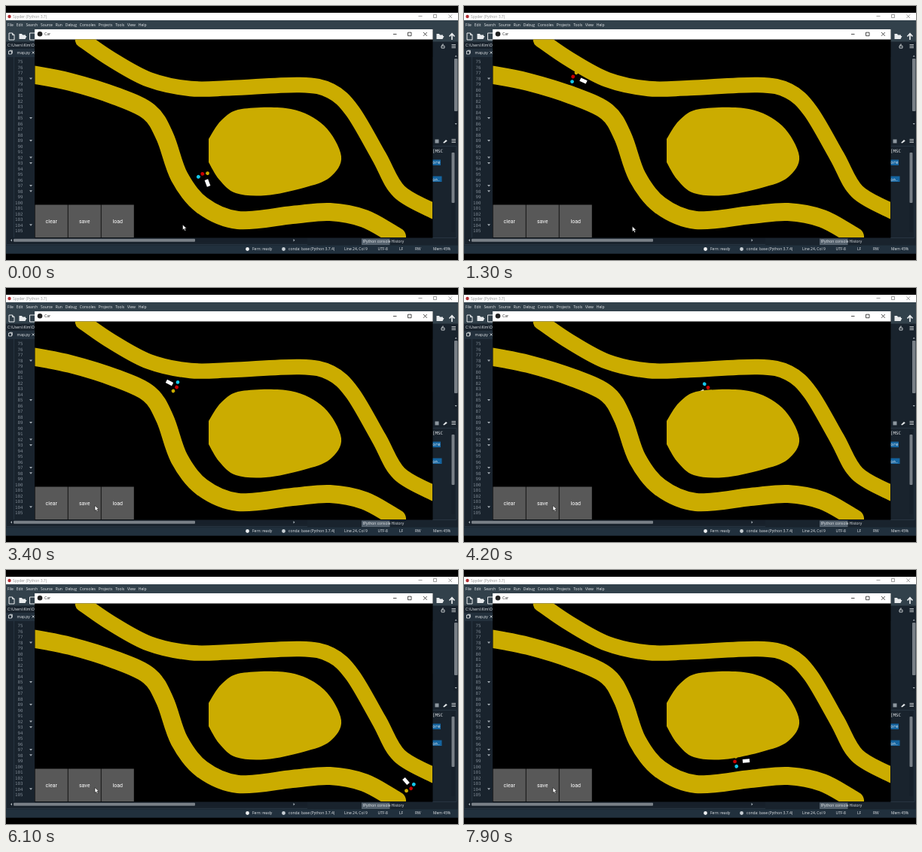
Recreate the animation shown at these times as an HTML page. Size 600x338 px, loop 8000 ms.

```html
<!DOCTYPE html>
<html lang="en">
<head>
<meta charset="utf-8">
<title>Car</title>
<style>
  html, body { margin: 0; width: 100%; height: 100%; overflow: hidden; background: #000; }
  svg { display: block; width: 100vw; height: 100vh; }
  text { font: 5px "Open Sans", "Noto Sans", sans-serif; fill: #e6e9ec; white-space: pre; }
  .mono { font: 5.8px "DejaVu Sans Mono", monospace; }
  .button { font: 7px Roboto, sans-serif; fill: #fff; text-anchor: middle; }
  .line { fill: none; stroke: #e8ebed; }
  .thin { fill: none; stroke: #e8ebed; stroke-width: .8; }
  .edge { fill: none; stroke: #2d3b48; stroke-width: .7; }
  .groove { fill: #17202a; }
  .handle { fill: #798087; }
</style>
</head>
<body>
<svg viewBox="0 0 600 338">
  <defs>
    <clipPath id="stage"><rect x="38.5" y="44.5" width="527.5" height="263.5"/></clipPath>
    <path id="folder" d="M0 7V0h3.500l1 1.500h4V3H10L8 7z" fill="#e8ebed"/>
    <path id="burger" d="M0 0h5.500M0 2h5.500M0 4h5.500" class="thin"/>
  </defs>
  <rect width="600" height="338"/>
  <rect y="9" width="600" height="320.5" fill="#19232d"/>

  <!-- editor window -->
  <rect y="9" width="600" height="10" fill="#fff"/>
  <circle cx="4.5" cy="14" r="2.2" fill="#b32d32"/>
  <text x="9" y="15.800" style="fill:#909090">Spyder (Python 3.7)</text>
  <path d="M547.5 13.500h5M567.500 11.500h4v4h-4zM587.500 11.500l4.500 4.500m0-4.500l-4.500 4.500" fill="none" stroke="#777" stroke-width=".7"/>
  <rect y="19" width="600" height="28.500" fill="#32414b"/>
  <text id="menu" y="27"></text>
  <path d="M4 36h4.500l2.500 2.500v6.500h-7zM8.500 36v2.500h2.500M31.500 36h7v9h-7z" class="line"/>
  <use href="#folder" x="17.500" y="37"/>
  <use href="#folder" x="571.500" y="37"/>
  <path d="M592 45v-8m-3.500 3.500l3.500-3.700l3.500 3.700" class="line" style="stroke-width:1.7"/>
  <text x="2" y="54">C:\Users\Kim\De</text>
  <path d="M578 53h4v3h-4zM579 53v-1.500q1-1.500 2 0" class="thin"/>
  <use href="#burger" x="591.500" y="51.500"/>
  <rect y="57" width="39" height="11" fill="#23303c"/>
  <path d="M3.500 60h4v4h-4zM5 60v-.8h3.300v4" class="thin"/>
  <text x="14.500" y="64">map.py</text>
  <path d="M34.700 60.500l3 3m0-3l-3 3" class="thin"/>
  <path d="M10.500 68v240M.5 68v249.500H400M566 68v70M566 186.500h32v122h-32" class="edge"/>
  <g id="gutter"></g>
  <rect x="5" y="308.500" width="395" height="6.500" class="groove"/>
  <rect x="10" y="309.800" width="241" height="4" rx="1" class="handle"/>
  <path d="M8 310l-2 1.800l2 1.800zM381.500 310l2 1.800l-2 1.800z" fill="#aab2b9"/>
  <rect x="594.500" y="65" width="5.500" height="96" class="groove"/>
  <rect x="595" y="70" width="4.500" height="70" rx="1" class="handle"/>
  <path d="M595.700 67.500l1.500-2l1.500 2zM595.700 156l1.500 2l1.500-2z" fill="#aab2b9"/>
  <rect x="569.500" y="177.500" width="5" height="5" fill="#8d979f"/>
  <path d="M580 182l4-4l1.800 1.500l-4 3z" fill="#e8ebed"/>
  <use href="#burger" x="591.500" y="177.500"/>
  <rect x="566" y="204.500" width="11" height="7.500" fill="#1464a0"/>
  <rect x="566" y="226.500" width="12.500" height="7.500" fill="#1464a0"/>
  <text x="566" y="195" class="mono">[MSC</text>
  <text x="566" y="210" class="mono">ore</text>
  <text x="566" y="232.500" class="mono">on.</text>
  <rect x="591" y="189" width="5" height="112" class="groove"/>
  <rect x="591.500" y="195" width="4" height="67" rx="1" class="handle"/>
  <rect x="472" y="309.500" width="37.500" height="8.500" fill="#54616d"/>
  <text x="473.500" y="315.300">IPython console</text>
  <text x="511.500" y="315">History</text>
  <rect y="318.500" width="600" height="11" fill="#21303d"/>
  <circle cx="320.500" cy="323.500" r="2.400" fill="#eef0f2"/>
  <circle cx="368.500" cy="323.500" r="2.400" fill="#c6cdd3"/>
  <g id="status"></g>

  <!-- game window -->
  <rect x="38" y="31" width="528.500" height="277.500"/>
  <rect x="38" y="31" width="528.500" height="13.500" fill="#fff"/>
  <circle cx="45" cy="37.300" r="3.300" fill="#222"/>
  <text x="51" y="39.300" style="fill:#222">Car</text>
  <path d="M514 37.500h4.500M533.500 35.200h4.500v4.500h-4.500zM554 35l4.800 4.800m0-4.800l-4.800 4.800" fill="none" stroke="#222" stroke-width=".8"/>
  <g clip-path="url(#stage)">
    <g id="car">
      <rect id="body" x="-4.600" y="-2.400" width="9.200" height="4.800" fill="#fff"/>
      <g id="sensors"></g>
    </g>
    <g id="sand" fill="none" stroke="#cbac00" stroke-linecap="round"></g>
  </g>
  <g id="buttons"></g>
  <path id="cursor" d="M0 0v7l1.700-1.500l1.200 2.700l1.300-.6l-1.200-2.600h2.200z" fill="#fff" stroke="#000" stroke-width=".5"/>
</svg>
<script>
const LOOP = 8000, STEP = 100;
const $ = id => document.getElementById(id);

function add(parent, tag, attrs, text) {
  const el = document.createElementNS("http://www.w3.org/2000/svg", tag);
  for (const name in attrs) el.setAttribute(name, attrs[name]);
  if (text !== undefined) el.textContent = text;
  return $(parent).appendChild(el);
}

// Labels and controls
"File Edit Search Source Run Debug Consoles Projects Tools View Help".split(" ")
  .forEach((name, i) => add("menu", "tspan", { dx: i ? 3.8 : 2 }, name));

const status = { "Fern: ready": 327, "conda: base (Python 3.7.4)": 375, "Line 24, Col 9": 449,
  "UTF-8": 493.5, "LF": 522, "RW": 543, "Mem 45%": 567 };
for (const text in status) add("status", "text", { x: status[text], y: 325.3 }, text);

const folds = [78, 85, 89, 92, 93, 97, 98, 104];
for (let n = 75; n <= 105; n++) {
  const y = 74.3 + (n - 75) * 7.49;
  add("gutter", "text", { x: 22.5, y: y + 2, class: "mono", style: "fill:#7d8791;text-anchor:end" }, n);
  if (folds.includes(n)) add("gutter", "path", { d: `M31 ${y - 1.2}h4l-2 2.5z`, fill: "#a5adb4" });
}

["clear", "save", "load"].forEach((name, i) => {
  const x = 38.6 + i * 44;
  add("buttons", "rect", { x, y: 264.5, width: 43.2, height: 43.5, fill: "#585858" });
  add("buttons", "text", { x: x + 21.6, y: 289.2, class: "button" }, name);
});

// Smooth path through a few points
function curve(points) {
  const at = i => points[Math.max(0, Math.min(points.length - 1, i))];
  let d = `M${points[0]}`;
  for (let i = 0; i < points.length - 1; i++) {
    const [a, b, c, e] = [at(i - 1), at(i), at(i + 1), at(i + 2)];
    const c1 = b.map((v, k) => v + (c[k] - a[k]) / 6);
    const c2 = c.map((v, k) => v - (e[k] - b[k]) / 6);
    d += `C${c1} ${c2} ${c}`;
  }
  return d;
}

// Roads are brush strokes, the island is a filled outline
add("sand", "path", { "stroke-width": 20.5, d: curve([[102, 45], [140, 71], [190, 98], [245, 110],
  [300, 109], [390, 105], [431, 113], [460, 140], [495, 200], [522, 247], [570, 274]]) });
add("sand", "path", { "stroke-width": 24, d: curve([[34, 91], [85, 101], [146, 120], [190, 141],
  [211, 174], [230, 227], [260, 265], [308, 285], [380, 278], [430, 274], [476, 283], [519, 307]]) });
add("sand", "path", { fill: "#cbac00", stroke: "none", d: curve([[269, 177], [286, 152], [313, 137],
  [378, 137], [422, 159], [445, 200], [430, 228], [395, 242], [345, 252], [305, 249], [283, 231], [269, 208]]) });

// Sensors fan out ahead of the car
["#cbac00", "#c80000", "#14c8eb"].forEach((fill, i) =>
  add("sensors", "circle", { cx: 13, r: 2.4, fill, transform: `rotate(${30 - 30 * i})` }));

// Key points of the drive: time, x, y
const route = [
  [0, 267.5, 235.5], [400, 247, 182], [900, 207, 121], [1300, 158.5, 99.5], [1950, 64, 54],
  [2200, 61, 72], [2700, 122, 85], [3400, 217, 126], [3800, 266, 160], [4500, 354, 123],
  [5000, 433, 139], [5400, 471, 193], [6100, 531, 281], [6450, 560, 295], [7200, 473, 247],
  [7900, 374.5, 254]
];

function drive(t) {
  const last = route.length - 1;
  const i = Math.max(0, route.findLastIndex((key, n) => n < last && key[0] <= t));
  const [a, b] = [route[i], route[i + 1]];
  const before = route[Math.max(0, i - 1)], after = route[Math.min(last, i + 2)];
  const span = b[0] - a[0], u = (t - a[0]) / span;
  return [1, 2].map(k => {
    const m = span * (b[k] - before[k]) / (b[0] - before[0]);
    const n = span * (after[k] - a[k]) / (after[0] - a[0]);
    const c3 = 2 * (a[k] - b[k]) + m + n;
    const c2 = b[k] - a[k] - m - c3;
    return a[k] + u * (m + u * (c2 + u * c3));
  });
}

function ease(t, from, to) {
  const u = Math.max(0, Math.min(1, (t - from) / (to - from)));
  return u * u * (3 - 2 * u);
}

function draw(t) {
  const [x, y] = drive(t);
  const [x0, y0] = drive(t - 1), [x1, y1] = drive(t + 1);
  const heading = Math.atan2(y1 - y0, x1 - x0) * 180 / Math.PI;
  $("car").setAttribute("transform", `translate(${x} ${y})`);
  $("body").setAttribute("transform", `rotate(${heading})`);
  $("sensors").setAttribute("transform", `translate(-2 0) rotate(${heading})`);

  const drift = ease(t, 0, 2200), hop = ease(t, 2700, 3300);
  $("cursor").setAttribute("transform",
    `translate(${234.5 - 17.5 * drift - 99 * hop} ${291 + 3.5 * drift - 5 * hop})`);
}

const start = performance.now();
function tick() {
  const t = (performance.now() - start) % LOOP;
  draw(Math.floor(t / STEP) * STEP);
  requestAnimationFrame(tick);
}
tick();
</script>
</body>
</html>
```
